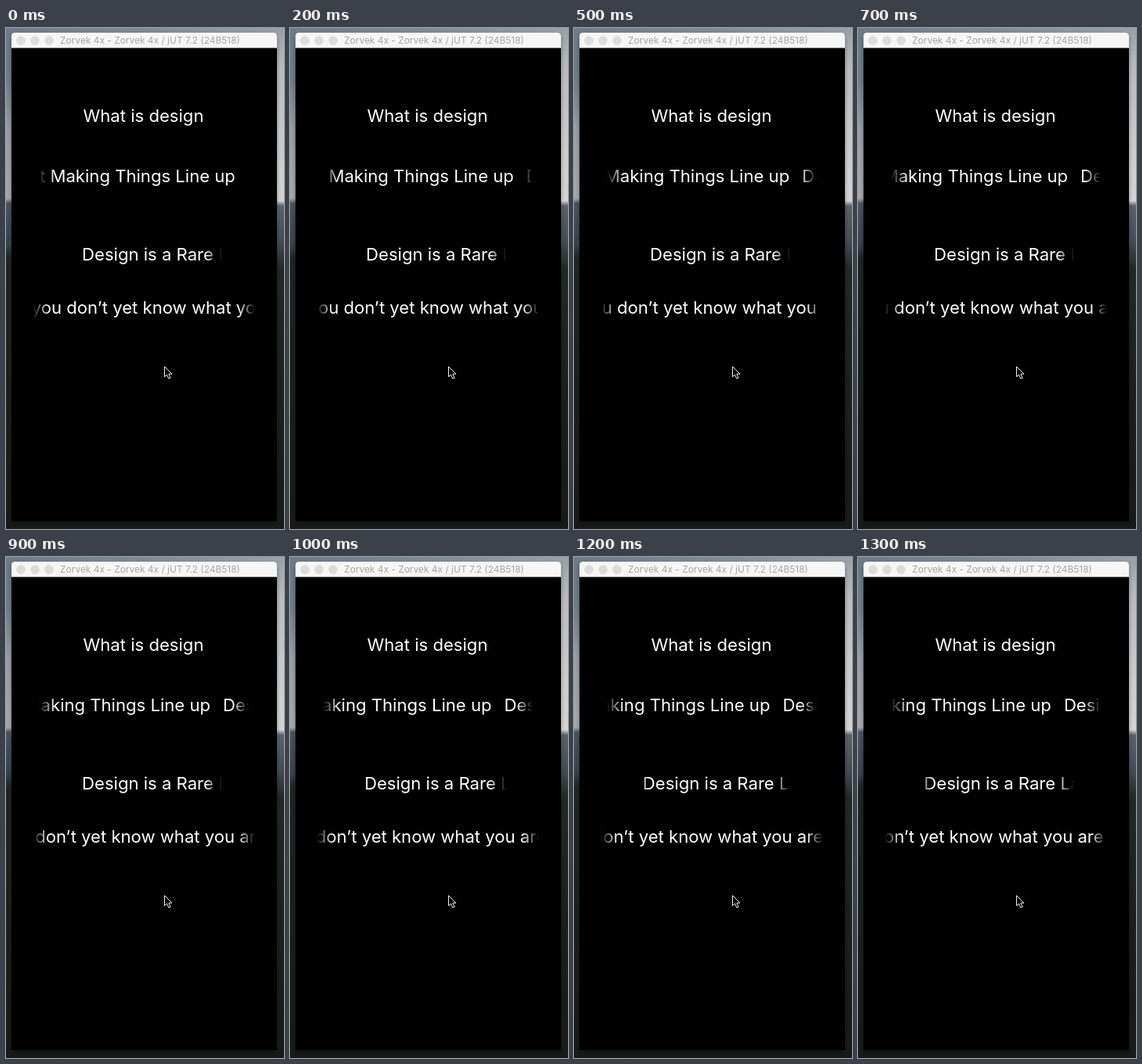
Animation of 355x640 px, one loop 1400 ms. Source, as an HTML page with a canvas:

```html
<!DOCTYPE html>
<html lang="en">
<head>
<meta charset="utf-8">
<title>Marquee labels</title>
<style>
  html, body { margin: 0; width: 100%; height: 100%; overflow: hidden; background: #000; }
  canvas { display: block; }
</style>
</head>
<body>
<canvas id="stage" width="355" height="640"></canvas>
<script>
const ctx = document.getElementById('stage').getContext('2d');
const LOOP = 1400, STEP = 100;
const FONT = 'Inter, "Liberation Sans", sans-serif';

// Scrolling labels: cx is the centre of `text` at time 0, speed is in px/s,
// left and right are the edges where the label has faded out.
const labels = [
  { before: 't ', text: 'Making Things Line up', after: 'Design', gap: 16,
    cx: 174.7, y: 197, speed: 35.4, delay: 0, left: 42, right: 310 },
  { before: '', text: 'Design is a Rare', after: ' La', gap: 0,
    cx: 181, y: 297, speed: 35.4, delay: 940, left: 75, right: 276 },
  { before: 'you ', text: 'don’t yet know what', after: ' you are', gap: 0,
    cx: 182.5, y: 365, speed: 44.6, delay: 0, left: 34, right: 318 }
];

function gradient(x0, y0, x1, y1, stops) {
  const g = ctx.createLinearGradient(x0, y0, x1, y1);
  for (const [at, color] of stops) g.addColorStop(at, color);
  return g;
}

function write(text, x, y, align) {
  ctx.textAlign = align;
  ctx.fillText(text, x, y);
}

// Sky, a mountain edge and dark woods, seen only around the window.
function drawWallpaper() {
  ctx.fillStyle = gradient(0, 0, 0, 640, [
    [0, '#6f7c88'], [0.1, '#717d88'], [0.2, '#9aa1a8'], [0.34, '#a9adb1'],
    [0.35, '#4b5661'], [0.43, '#39444e'], [0.46, '#1f2725'], [0.7, '#1b221d'], [1, '#171b17']
  ]);
  ctx.fillRect(0, 0, 178, 640);
  ctx.fillStyle = gradient(0, 0, 0, 640, [
    [0, '#9aa3ab'], [0.08, '#b9bdc1'], [0.2, '#c9cbcd'], [0.345, '#d6d6d5'],
    [0.355, '#5a6570'], [0.43, '#414c56'], [0.48, '#222a28'], [0.7, '#1c221d'], [1, '#171b17']
  ]);
  ctx.fillRect(178, 0, 177, 640);
  ctx.fillStyle = gradient(0, 0, 355, 0, [[0, '#6f7c88'], [0.5, '#7f8b96'], [1, '#9aa3ab']]);
  ctx.fillRect(0, 0, 355, 8);
}

function drawWindow() {
  ctx.save();
  ctx.shadowColor = 'rgba(0,0,0,.35)';
  ctx.shadowBlur = 6;
  ctx.shadowOffsetY = 3;
  ctx.fillStyle = '#000';
  ctx.beginPath();
  ctx.roundRect(7, 6, 339, 624, [4, 4, 0, 0]);
  ctx.fill();
  ctx.restore();

  ctx.fillStyle = '#f6f6f6';
  ctx.beginPath();
  ctx.roundRect(7, 6, 339, 19.5, [4, 4, 0, 0]);
  ctx.fill();

  ctx.fillStyle = '#dcdcdc';
  ctx.strokeStyle = '#cfcfcf';
  ctx.lineWidth = 0.6;
  for (const x of [19, 37, 55]) {
    ctx.beginPath();
    ctx.arc(x, 16, 5.3, 0, Math.PI * 2);
    ctx.fill();
    ctx.stroke();
  }

  ctx.fillStyle = '#a6a6a6';
  ctx.font = '11.95px ' + FONT;
  write('Zorvek 4x - Zorvek 4x / jUT 7.2 (24B518)', 184, 20.3, 'center');
}

function drawLabel(label, time) {
  const { before, text, after, gap, cx, y, speed, delay, left, right } = label;
  const x = cx - speed * Math.max(0, time - delay) / 1000;
  const half = ctx.measureText(text).width / 2;
  const fade = 21 / (right - left);
  ctx.save();
  ctx.beginPath();
  ctx.rect(left, y - 30, right - left, 45);
  ctx.clip();
  ctx.fillStyle = gradient(left, 0, right, 0, [
    [0, '#000'], [fade, '#fff'], [1 - fade, '#fff'], [1, '#000']
  ]);
  write(before, x - half, y, 'right');
  write(text, x, y, 'center');
  write(after, x + half + gap, y, 'left');
  ctx.restore();
}

function drawCursor() {
  const arrow = new Path2D('M202.5 432.5V445.5L205.5 442.8L207.8 448L210 447L207.8 442H212Z');
  ctx.fillStyle = '#000';
  ctx.fill(arrow);
  ctx.strokeStyle = '#f2f2f2';
  ctx.lineWidth = 1;
  ctx.stroke(arrow);
}

function draw(now) {
  const time = Math.floor(now % LOOP / STEP) * STEP;
  drawWallpaper();
  drawWindow();
  ctx.font = '22.1px ' + FONT;
  ctx.fillStyle = '#fff';
  write('What is design', 175.5, 120, 'center');
  for (const label of labels) drawLabel(label, time);
  drawCursor();
}

let start;
function tick(now) {
  start ??= now;
  draw(now - start);
  requestAnimationFrame(tick);
}
requestAnimationFrame(tick);
</script>
</body>
</html>
```
